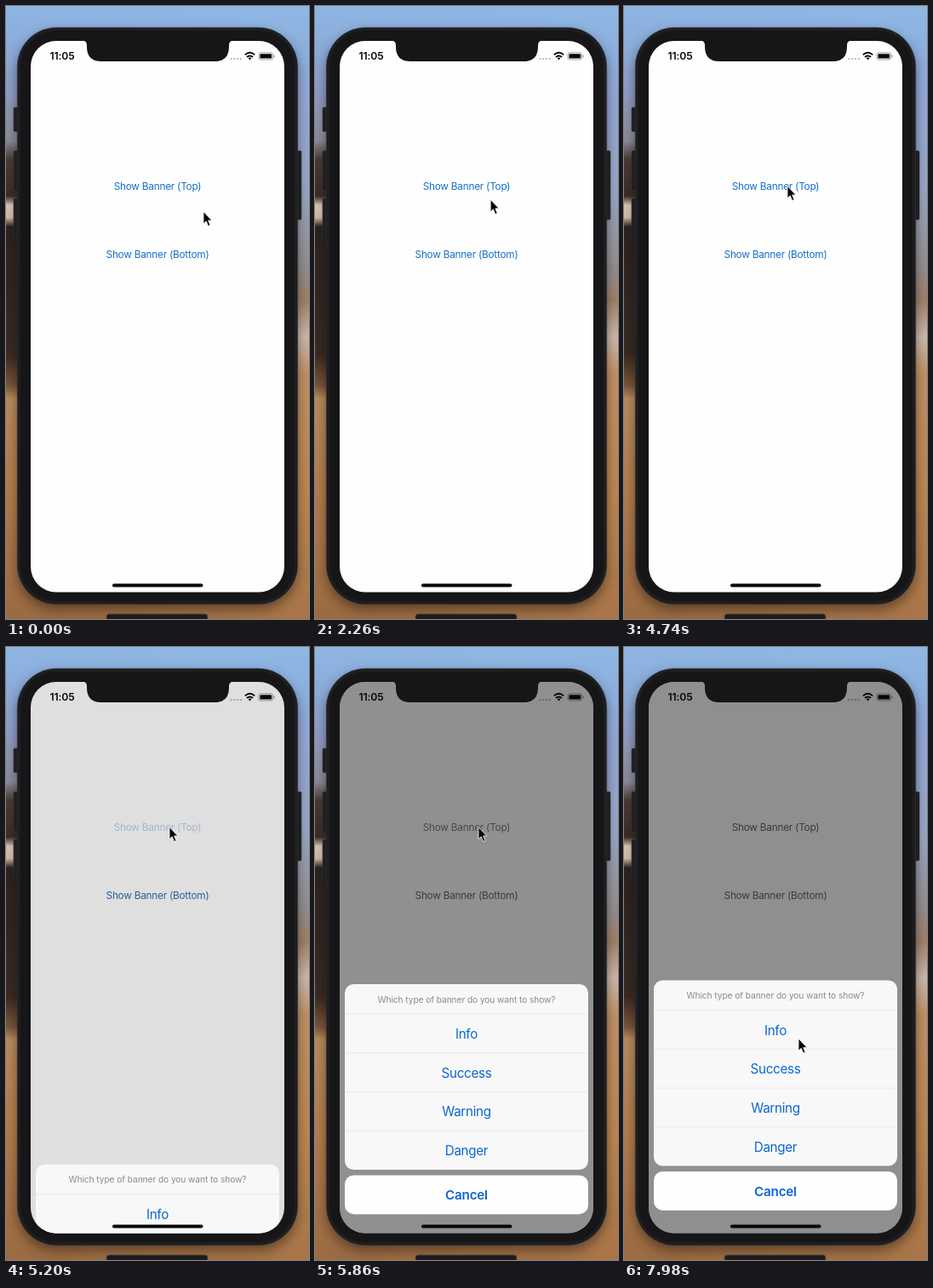
Write an HTML page that moves like this. It is 356 px wide and 720 px high and loops after 8 s.

```html
<!DOCTYPE html>
<html lang="en">
<head>
<meta charset="utf-8">
<title>Banner menu</title>
<style>
  html, body { margin: 0; width: 100%; height: 100%; overflow: hidden; background: #a8764a; }
  svg { display: block; width: 356px; height: 720px; font-family: Inter, "Open Sans", sans-serif; }
  text { text-anchor: middle; }
  .button { font-size: 11.8px; letter-spacing: -.24px; }
  .row { font-size: 15.2px; letter-spacing: -.3px; fill: #0b66d0; }
  .cancel { font-weight: 600; letter-spacing: -.2px; }
  .title { font-size: 10.2px; letter-spacing: -.08px; fill: #8a8a8c; }
</style>
</head>
<body>
<svg viewBox="0 0 356 720">
  <defs>
    <linearGradient id="left" x2="0" y2="1">
      <stop offset="0" stop-color="#8fb7e4"/>
      <stop offset=".08" stop-color="#8aa9d6"/>
      <stop offset=".14" stop-color="#8f9cc4"/>
      <stop offset=".22" stop-color="#8a8a98"/>
      <stop offset=".25" stop-color="#4a3a34"/>
      <stop offset=".31" stop-color="#3a2c28"/>
      <stop offset=".325" stop-color="#d8c4b2"/>
      <stop offset=".345" stop-color="#d0b8a4"/>
      <stop offset=".36" stop-color="#2c2220"/>
      <stop offset=".57" stop-color="#3a2a22"/>
      <stop offset=".62" stop-color="#7a563a"/>
      <stop offset=".64" stop-color="#b88a5c"/>
      <stop offset=".8" stop-color="#b07c4c"/>
      <stop offset="1" stop-color="#9a6a42"/>
    </linearGradient>
    <linearGradient id="right" x2="0" y2="1">
      <stop offset="0" stop-color="#8fb7e4"/>
      <stop offset=".07" stop-color="#8cb0de"/>
      <stop offset=".14" stop-color="#93a8d8"/>
      <stop offset=".3" stop-color="#98a6c4"/>
      <stop offset=".43" stop-color="#948c8c"/>
      <stop offset=".48" stop-color="#a08068"/>
      <stop offset=".54" stop-color="#ccb8ac"/>
      <stop offset=".6" stop-color="#c09064"/>
      <stop offset=".8" stop-color="#bc8650"/>
      <stop offset="1" stop-color="#a87448"/>
    </linearGradient>
    <linearGradient id="blend">
      <stop offset=".1" stop-color="#000"/>
      <stop offset=".9" stop-color="#fff"/>
    </linearGradient>
    <mask id="fade"><rect width="356" height="720" fill="url(#blend)"/></mask>
    <filter id="soft" x="-20%" y="-20%" width="140%" height="140%"><feGaussianBlur stdDeviation="7"/></filter>
    <clipPath id="screen"><rect x="29" y="41" width="298" height="647.5" rx="30"/></clipPath>
  </defs>

  <rect width="356" height="720" fill="url(#left)"/>
  <rect width="356" height="720" fill="url(#right)" mask="url(#fade)"/>
  <rect x="13" y="31" width="330" height="678" rx="46" opacity=".4" filter="url(#soft)"/>
  <rect x="118" y="714" width="119" height="10" rx="3" fill="#1c1c1e" stroke="#5c4c42"/>

  <g fill="#1e1e20" stroke="#343436" stroke-width=".6">
    <rect x="9" y="119" width="6" height="28.5" rx="1.5"/>
    <rect x="9" y="170" width="6" height="47" rx="1.5"/>
    <rect x="9" y="226" width="6" height="47" rx="1.5"/>
    <rect x="341" y="170" width="6" height="81" rx="1.5"/>
    <rect x="13.3" y="25.3" width="329.4" height="677.4" rx="46"/>
  </g>
  <rect x="17" y="29" width="322" height="670" rx="42" fill="#161618"/>

  <g clip-path="url(#screen)">
    <rect x="29" y="41" width="298" height="648" fill="#fefefe"/>
    <text id="top" class="button" x="178" y="216.4">Show Banner (Top)</text>
    <text id="bottom" class="button" x="178" y="296.4">Show Banner (Bottom)</text>
    <rect id="dim" x="29" y="41" width="298" height="648"/>
    <g id="sheet">
      <rect x="35" width="286" height="218" rx="10.5" fill="#f8f8f8"/>
      <text class="title" x="178" y="21.6">Which type of banner do you want to show?</text>
      <g id="rows"></g>
      <rect x="35" y="224.5" width="286" height="45.7" rx="10.5" fill="#fefefe"/>
      <text class="row cancel" x="178" y="253">Cancel</text>
    </g>
  </g>

  <path d="M90 40.5Q95 41 95 46V48Q95 65 112 65H245Q262 65 262 48V46Q262 41 267 40.5Z" fill="#161618"/>
  <text x="66" y="63.3" font-size="12.2" font-weight="600" letter-spacing="-.1" fill="#080808">11:05</text>
  <path d="M263.5 62H277" stroke="#000" stroke-width="1.8" stroke-dasharray="2 1.8" opacity=".25"/>
  <g fill="none" stroke="#080808" stroke-width="1.9">
    <path d="M280.8 57.4Q286.5 52.2 292.2 57.4M283 60Q286.5 56.8 290 60"/>
    <path d="M284.6 61.2Q286.5 59.8 288.4 61.2L286.5 63.4Z" fill="#080808" stroke="none"/>
    <rect x="297" y="54.8" width="16.6" height="8.2" rx="2.4" stroke="#000" stroke-opacity=".45" stroke-width=".8"/>
    <rect x="298.4" y="56.2" width="13.8" height="5.4" rx="1.2" fill="#080808" stroke="none"/>
    <path d="M315 57.6V60.4" stroke="#000" stroke-opacity=".45" stroke-width="1"/>
  </g>
  <rect x="125" y="678.6" width="106.5" height="3.8" rx="1.9" fill="#080808"/>

  <path id="cursor" d="M0 0V14.2L3.2 11.3L5.6 17L8 16L5.7 10.4H10Z" fill="#050505" stroke="#fff" stroke-width=".8"/>
</svg>
<script>
const LOOP = 8000;
const OPEN_AT = 5070, SPRING = 7.8, REST_Y = 391.5, TRAVEL = 297;
const DIM = .44;
const PRESS_AT = 4800, RELEASE_AT = 5050, FADE = 1000;

// Pointer tip: a decelerating approach to the button, then a move down to the menu
const FROM = [232, 241.5], BUTTON = [192, 211.5], MENU = [205, 460];
const APPROACH_END = 4740, LEAVE_AT = 6050, ARRIVE_AT = 7950;

const part = id => document.getElementById(id);
const clamp = v => Math.min(1, Math.max(0, v));
const mix = (a, b, k) => a + (b - a) * k;
const mixAll = (a, b, k) => a.map((v, i) => mix(v, b[i], k));
const smooth = k => k * k * (3 - 2 * k);

part('rows').innerHTML = ['Info', 'Success', 'Warning', 'Danger'].map((label, i) => {
  const y = 35.2 + i * 45.7;
  return `<path d="M35 ${y}H321" stroke="#e6e6e2" stroke-width=".8"/>
    <text class="row" x="178" y="${y + 28.8}">${label}</text>`;
}).join('');

function pointerAt(t) {
  if (t < LEAVE_AT) {
    const left = 1 - clamp(t / APPROACH_END);
    return [mix(BUTTON[0], FROM[0], left ** 1.6), mix(BUTTON[1], FROM[1], mix(left, smooth(left), .75))];
  }
  return mixAll(BUTTON, MENU, smooth(clamp((t - LEAVE_AT) / (ARRIVE_AT - LEAVE_AT))));
}

// Critically damped spring
function openness(t) {
  const s = Math.max(0, t - OPEN_AT) / 1000 * SPRING;
  return 1 - (1 + s) * Math.exp(-s);
}

function draw(now) {
  const t = now % LOOP;
  const open = openness(t);
  const tint = `rgb(${mixAll([22, 112, 200], [104, 104, 112], open)})`;
  part('top').setAttribute('fill', tint);
  part('bottom').setAttribute('fill', tint);
  part('top').setAttribute('opacity', t < PRESS_AT ? 1 : mix(.2, 1, clamp((t - RELEASE_AT) / FADE)));
  part('dim').setAttribute('opacity', DIM * open);
  part('sheet').setAttribute('transform', `translate(0 ${REST_Y + TRAVEL * (1 - open)})`);
  part('cursor').setAttribute('transform', `translate(${pointerAt(t)})`);
}

const start = performance.now();
function tick() {
  draw(performance.now() - start);
  requestAnimationFrame(tick);
}
tick();
</script>
</body>
</html>
```
